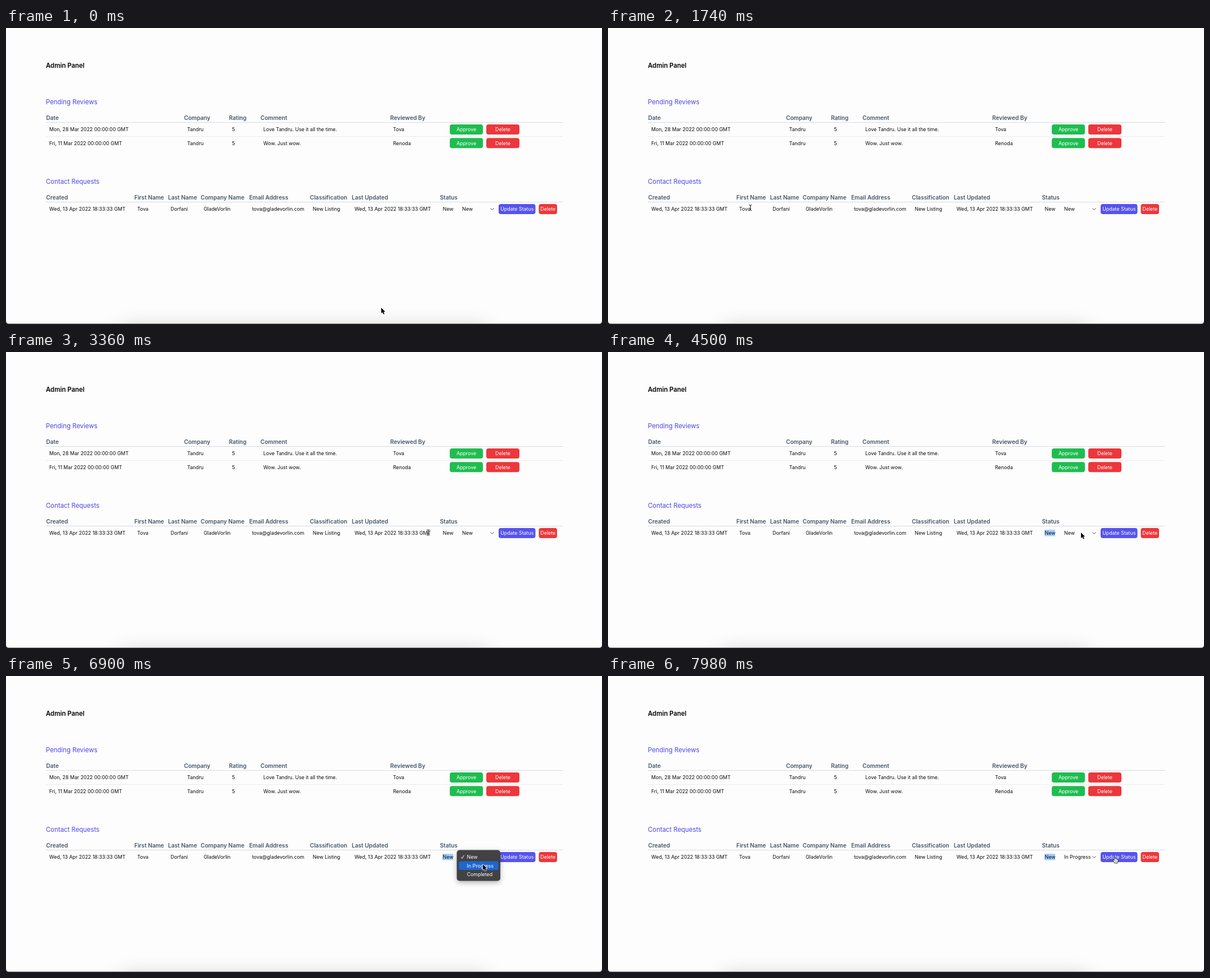
Write an HTML page with a canvas that moves like this. It is 1061 by 528 pixels and loops after 8 s.

```html
<!DOCTYPE html>
<html lang="en">
<head>
<meta charset="utf-8">
<title>Admin Panel</title>
<style>
html, body { margin: 0; width: 100%; height: 100%; overflow: hidden; background: #fdfdfd; }
canvas { display: block; }
</style>
</head>
<body>
<canvas id="stage" width="1061" height="528"></canvas>
<script>
const ctx = document.getElementById('stage').getContext('2d');
const LOOP = 8000;
const BODY = '8.85px Inter, sans-serif';
const HEAD = '600 10.1px Inter, sans-serif';
const TITLE = '11.4px Inter, sans-serif';
const INK = '#0b0b0d', SLATE = '#475569', INDIGO = '#4f46e5';
const GREEN = '#1fbd50', RED = '#ec373c', VIOLET = '#5753ee';

// Pointer path: time, x, y and the shape used from that time on.
const path = [
  [0, 668, 499, 'arrow'], [180, 668, 499, 'arrow'], [780, 120, 333, 'beam'],
  [960, 83, 322, 'beam'], [1260, 83, 322, 'beam'], [1620, 240, 321, 'beam'],
  [2040, 308, 319, 'beam'], [2340, 373, 318, 'beam'], [2700, 480, 321, 'beam'],
  [3120, 650, 322, 'beam'], [3480, 787, 322, 'beam'], [4020, 787, 322, 'beam'],
  [4140, 800, 322, 'arrow'], [4320, 842, 322, 'arrow'], [6600, 842, 322, 'arrow'],
  [6900, 849, 336, 'arrow'], [7140, 849, 336, 'arrow'], [7320, 882, 331, 'arrow'],
  [7440, 893, 326, 'hand'], [7620, 901, 322, 'hand'], [LOOP, 901, 322, 'hand']
];
const SELECTED = 3660, MENU_OPEN = 6480, MENU_CLOSE = 7140, MENU_GONE = 7370;

const clamp = v => Math.max(0, Math.min(1, v));
const ease = p => p * p * (3 - 2 * p);

function text(str, x, y, font = BODY, color = INK, align = 'left') {
  ctx.font = font;
  ctx.fillStyle = color;
  ctx.textAlign = align;
  ctx.fillText(str, x, y);
}

function box(x, y, w, h, r, color) {
  ctx.fillStyle = color;
  ctx.beginPath();
  ctx.roundRect(x, y, w, h, r);
  ctx.fill();
}

function row(cells, y, font, color) {
  cells.forEach(([x, str]) => text(str, x, y, font, color));
}

function button(label, x, y, w, color) {
  box(x, y, w, 18, 4, color);
  text(label, x + w / 2, y + 12.2, BODY, '#fff', 'center');
}

function rule(y, color, dash) {
  ctx.strokeStyle = color;
  ctx.lineWidth = 1;
  ctx.setLineDash(dash);
  ctx.beginPath();
  ctx.moveTo(71, y);
  ctx.lineTo(991, y);
  ctx.stroke();
  ctx.setLineDash([]);
}

function background() {
  ctx.fillStyle = '#fdfdfd';
  ctx.fillRect(0, 0, 1061, 528);
  ctx.save();
  ctx.shadowColor = 'rgba(0,0,0,.32)';
  ctx.shadowBlur = 38;
  ctx.fillStyle = '#000';
  ctx.fillRect(205, 541, 650, 40);
  ctx.restore();
  ctx.fillStyle = '#8c8c8c';
  ctx.fillRect(0, 527, 1061, 1);
  ctx.fillStyle = '#111';
  for (const [x, dir] of [[0, 1], [1061, -1]]) {
    ctx.beginPath();
    ctx.moveTo(x, 522);
    ctx.quadraticCurveTo(x, 528, x + 6 * dir, 528);
    ctx.lineTo(x, 528);
    ctx.fill();
  }
}

function reviews() {
  text('Pending Reviews', 71, 136, TITLE, INDIGO);
  row([[71.5, 'Date'], [317, 'Company'], [397, 'Rating'], [453, 'Comment'], [684, 'Reviewed By']],
    164, HEAD, SLATE);
  rule(168.5, '#c3cad3', [2, 1]);
  const entries = [
    ['Mon, 28 Mar 2022 00:00:00 GMT', 'Love Tandru. Use it all the time.', 'Tova'],
    ['Fri, 11 Mar 2022 00:00:00 GMT', 'Wow. Just wow.', 'Renoda']
  ];
  entries.forEach(([date, comment, author], i) => {
    const y = 184.3 + i * 24.3;
    row([[77, date], [322.5, 'Tandru'], [402.3, '5'], [458, comment], [689, author]], y);
    button('Approve', 790, y - 12.3, 59, GREEN);
    button('Delete', 855, y - 12.3, 59, RED);
  });
  rule(193.5, '#e9ecea', []);
}

function contacts(t) {
  text('Contact Requests', 71, 277.5, TITLE, INDIGO);
  row([[71.5, 'Created'], [228.5, 'First Name'], [288.5, 'Last Name'], [346.5, 'Company Name'],
    [433, 'Email Address'], [541, 'Classification'], [615.5, 'Last Updated'], [772.5, 'Status']],
    305.7, HEAD, SLATE);
  rule(310.5, '#c3cad3', [2, 1]);
  if (t >= SELECTED) box(777, 317, 19, 11.5, 0, '#a6cffa');
  const stamp = 'Wed, 13 Apr 2022 18:33:33 GMT';
  row([[77, stamp], [233.5, 'Tova'], [293, 'Dorfani'], [352, 'GladeVorlin'],
    [438, 'tova@gladevorlin.com'], [546, 'New Listing'], [620.5, stamp], [777.5, 'New'],
    [812, t < MENU_GONE ? 'New' : 'In Progress']], 326.2);
  ctx.strokeStyle = '#3f3f46';
  ctx.lineWidth = 1;
  ctx.beginPath();
  ctx.moveTo(862.5, 321.5);
  ctx.lineTo(865.5, 324.5);
  ctx.lineTo(868.5, 321.5);
  ctx.stroke();
  button('Update Status', 877, 314, 65.5, VIOLET);
  button('Delete', 948.5, 314, 32.5, RED);
}

function menu(t) {
  if (t < MENU_OPEN || t >= MENU_GONE) return;
  ctx.save();
  ctx.globalAlpha = 1 - clamp((t - MENU_CLOSE) / (MENU_GONE - MENU_CLOSE));
  ctx.shadowColor = 'rgba(0,0,0,.3)';
  ctx.shadowBlur = 10;
  ctx.shadowOffsetY = 3;
  box(802.5, 310.5, 77.5, 55, 5, '#424244');
  ctx.shadowColor = 'transparent';
  const active = t < 6760 ? 0 : 1;
  box(806, 315 + active * 15.5, 70.5, 15.5, 3, '#1f66cf');
  ctx.strokeStyle = '#fff';
  ctx.lineWidth = 1;
  ctx.beginPath();
  ctx.moveTo(810, 323);
  ctx.lineTo(812, 325.5);
  ctx.lineTo(815.5, 319.5);
  ctx.stroke();
  ['New', 'In Progress', 'Completed'].forEach((label, i) =>
    text(label, 820.5, 326.2 + i * 15.4, BODY, '#fff'));
  ctx.restore();
}

const arrowShape = new Path2D('M0 0V10L2.3 7.9L4 11.7L5.7 10.9L4.1 7.3H7.2Z');
const beamShape = new Path2D('M-2.5 -5Q0 -5 0 -3.5Q0 -5 2.5 -5M0 -4V4M-2.5 5Q0 5 0 3.5Q0 5 2.5 5M-1.3 1.5H1.3');
const handShape = new Path2D('M0 1Q0 0 .9 0Q1.8 0 1.8 1V4.2Q3.4 3.4 3.8 4.6Q5.4 4.1 5.6 5.3Q7 5 7 6.3V8.7L6 11.8H.8L-2.4 7.2Q-2.6 5.9 -1.2 6.2L0 7.2Z');

function cursor(t) {
  let i = 0;
  while (i < path.length - 2 && path[i + 1][0] <= t) i++;
  const [t0, x0, y0, shape] = path[i];
  const [t1, x1, y1] = path[i + 1];
  const p = ease(clamp((t - t0) / (t1 - t0)));
  ctx.save();
  ctx.translate(x0 + (x1 - x0) * p, y0 + (y1 - y0) * p);
  ctx.lineJoin = 'round';
  if (shape === 'beam') {
    ctx.strokeStyle = 'rgba(255,255,255,.8)';
    ctx.lineWidth = 2;
    ctx.stroke(beamShape);
    ctx.strokeStyle = '#111';
    ctx.lineWidth = 1;
    ctx.stroke(beamShape);
  } else if (shape === 'hand') {
    ctx.fillStyle = '#fff';
    ctx.fill(handShape);
    ctx.strokeStyle = '#111';
    ctx.lineWidth = .9;
    ctx.stroke(handShape);
    ctx.beginPath();
    for (const x of [1.6, 3.2, 4.8]) {
      ctx.moveTo(x, 7);
      ctx.lineTo(x, 9.5);
    }
    ctx.lineWidth = .5;
    ctx.stroke();
  } else {
    ctx.strokeStyle = '#fff';
    ctx.lineWidth = 1.4;
    ctx.stroke(arrowShape);
    ctx.fillStyle = '#000';
    ctx.fill(arrowShape);
  }
  ctx.restore();
}

function draw(now) {
  const t = now % LOOP;
  background();
  text('Admin Panel', 71, 71, '600 11.4px Inter, sans-serif', '#000');
  reviews();
  contacts(t);
  menu(t);
  cursor(t);
}

let start;
function tick(now) {
  start ??= now;
  draw(now - start);
  requestAnimationFrame(tick);
}
requestAnimationFrame(tick);
</script>
</body>
</html>
```
